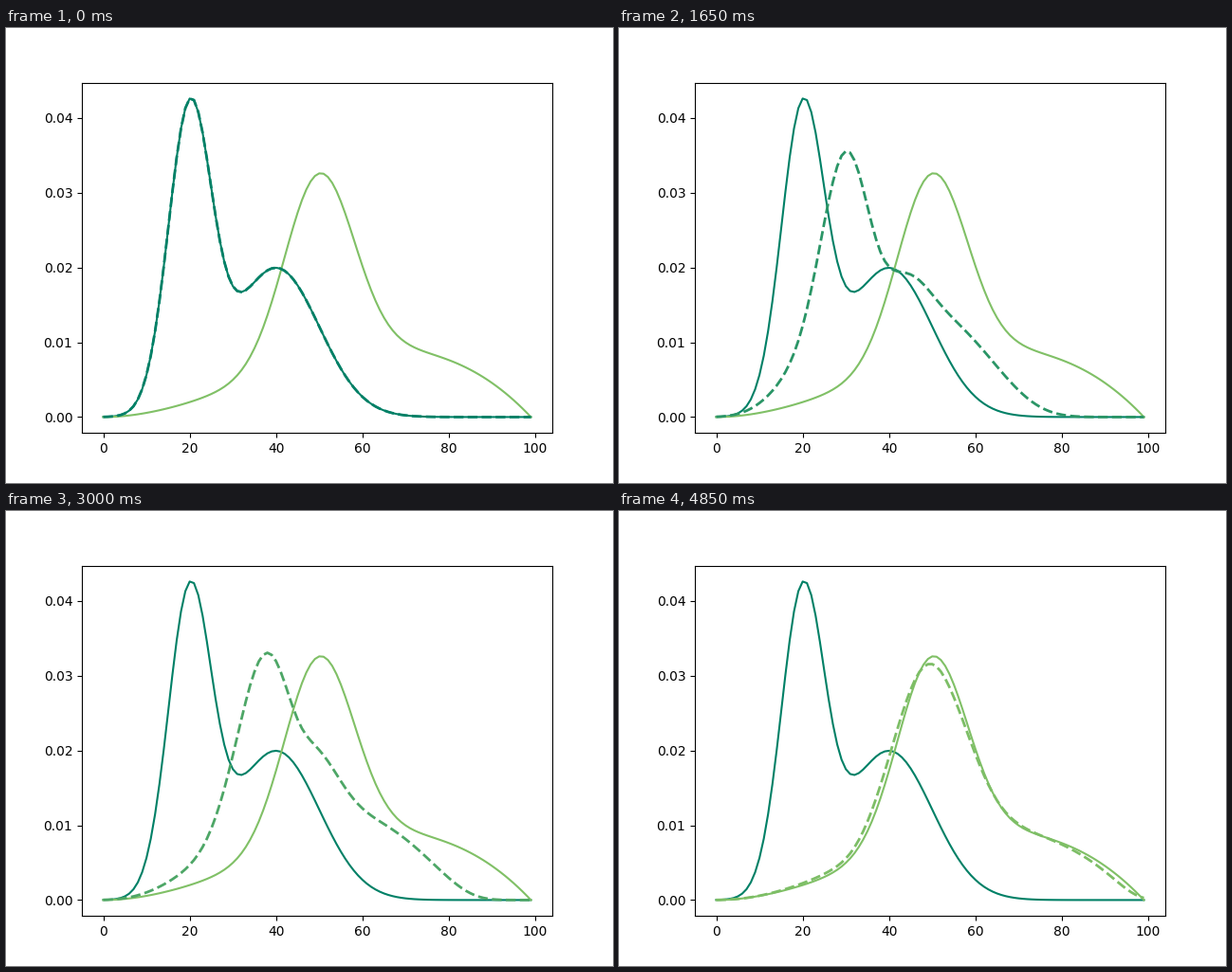
Write a matplotlib script that moves like this. It is 640 by 480 pixels and loops after 4900 ms.

```python
import numpy as np
import matplotlib.pyplot as plt
from matplotlib.animation import FuncAnimation

N = 100          # grid points
FRAMES = 98
INTERVAL = 50    # ms
REG = 1e-3       # entropic regularisation

x = np.arange(N)


def normed(a):
    return a / a.sum()


def gauss(mean, std):
    return normed(np.exp(-((x - mean) ** 2) / (2 * std**2)))


u01 = x / (N - 1)
start = normed(gauss(20, 5) + gauss(40, 10))
end = normed(normed(u01**2 * (1 - u01)) + gauss(50, 8))
pair = np.column_stack([start, end])

cost = (x[:, None] - x[None, :]) ** 2 / (N - 1) ** 2
kernel = np.exp(-cost / REG)


def geo_mean(cols, weights):
    return np.exp(np.log(cols) @ weights)


def barycenter(t, max_iter=1000, tol=1e-4):
    """Entropic Wasserstein barycenter of the two curves at weight t."""
    weights = np.array([1 - t, t])
    proj = kernel @ (pair / kernel.sum(axis=0)[:, None])
    scale = geo_mean(proj, np.array([0.5, 0.5]))[:, None] / proj
    for i in range(max_iter):
        proj = scale * (kernel @ (pair / (kernel @ scale)))
        scale = scale * geo_mean(proj, weights)[:, None] / proj
        if i % 10 == 0 and proj.std(axis=1).sum() < tol:
            break
    return geo_mean(proj, weights)


steps = np.arange(FRAMES) / (N - 1)
curves = [start] + [barycenter(t) for t in steps[1:]]


def shade(t):
    return plt.cm.summer(t / 2)


fig, ax = plt.subplots(figsize=(6.4, 4.8), dpi=100)
ax.plot(x, start, color=shade(0.0))
ax.plot(x, end, color=shade(1.0))
(moving,) = ax.plot(x, start, "--", lw=2, color=shade(0.0))


def update(i):
    moving.set_ydata(curves[i])
    moving.set_color(shade(steps[i]))
    return (moving,)


anim = FuncAnimation(fig, update, frames=FRAMES, interval=INTERVAL,
                     repeat=True, repeat_delay=0)
plt.show()
```
